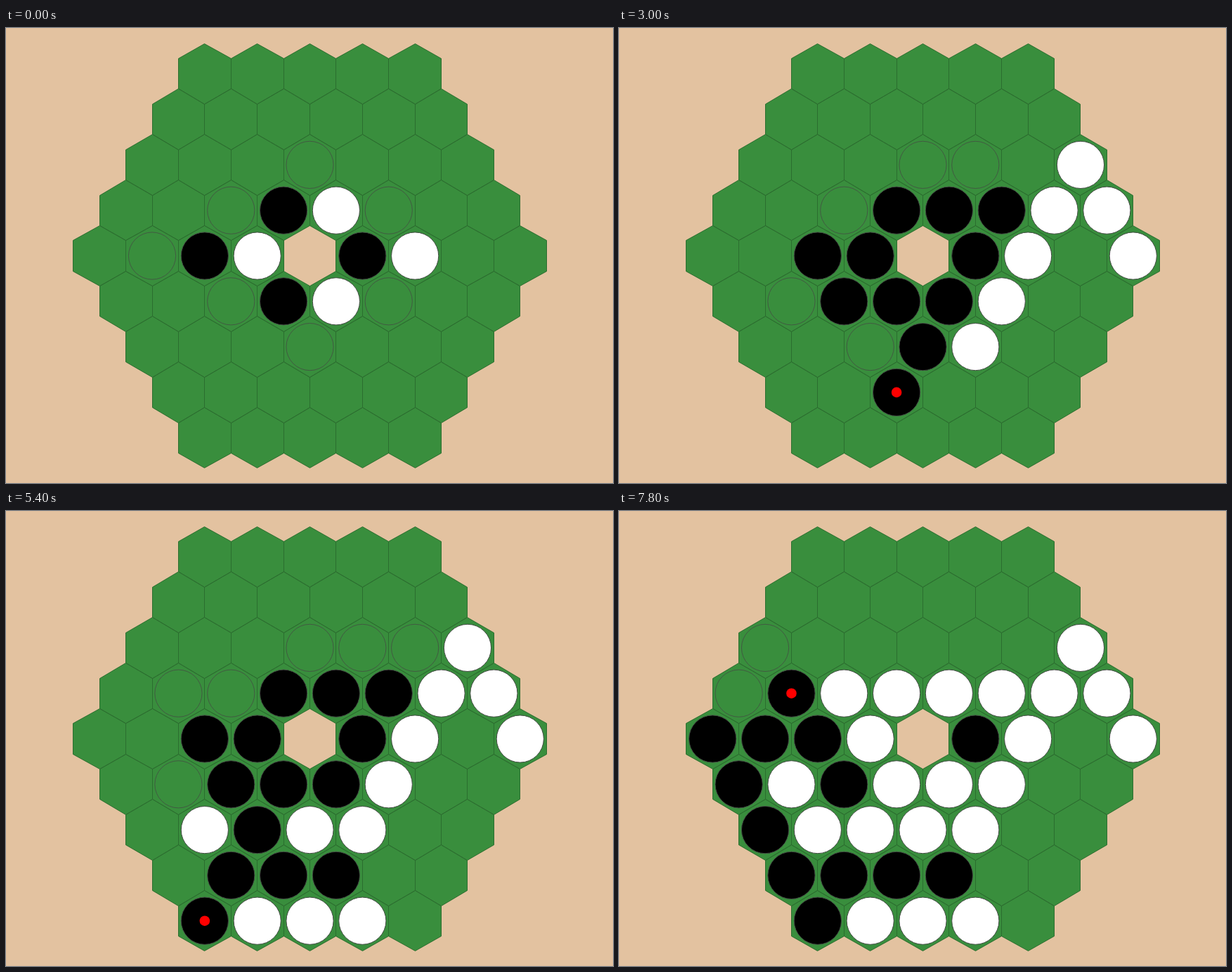
Recreate the animation shown at these times as an HTML page with a canvas. Size 864x648 px, loop 8 s.

```html
<!DOCTYPE html>
<html lang="en">
<head>
<meta charset="utf-8">
<title>Hexagonal Reversi</title>
<style>
  html, body { margin: 0; width: 100%; height: 100%; overflow: hidden; background: #e3c2a0; }
  canvas { display: block; width: 100%; height: 100%; }
</style>
</head>
<body>
<canvas id="board" width="864" height="648"></canvas>
<script>
const ctx = document.getElementById('board').getContext('2d');
const LOOP = 8000, STEP = 300;
const CX = 432.5, CY = 324.5, SIZE = 43.2, HALF = SIZE * Math.sqrt(3) / 2;
const STONE = 33.6, DOT = 7.3;
const WHITE = '#fff', BLACK = '#000';
const DIRS = [[1, 0], [0, 1], [-1, 1], [-1, 0], [0, -1], [1, -1]];

// Moves in axial coordinates [q, r]; white starts and the players alternate.
const MOVES = [
  [-1, 2], [-2, 1], [2, -1], [3, -1], [4, -2], [4, -1], [4, 0],
  [1, 1], [0, 2], [-2, 3], [-2, 2], [-3, 3], [-3, 4],
  [-2, 4], [-1, 4], [-1, 3], [-3, 2], [-4, 4], [-3, 1], [-4, 3],
  [-4, 2], [-4, 1], [-3, 0], [-4, 0], [-1, -1], [-2, -1]
];

const key = (q, r) => q + ',' + r;
const player = turn => turn % 2 ? BLACK : WHITE;
const centre = ([q, r]) => [CX + HALF * (2 * q + r), CY + SIZE * 1.5 * r];
const snap = v => Math.floor(v) + 0.5;

const cells = [];
for (let r = -4; r <= 4; r++)
  for (let q = -4; q <= 4; q++)
    if (Math.abs(q + r) <= 4 && (q || r)) cells.push([q, r]);

function captures(stones, [q, r], color) {
  const taken = [];
  if (stones.has(key(q, r))) return taken;
  for (const [dq, dr] of DIRS) {
    const line = [];
    for (let n = 1; ; n++) {
      const k = key(q + n * dq, r + n * dr), found = stones.get(k);
      if (found === color) taken.push(...line);
      if (!found || found === color) break;
      line.push(k);
    }
  }
  return taken;
}

function playGame() {
  let stones = new Map();
  [[1, -1], [-1, 0], [2, 0], [0, 1]].forEach(c => stones.set(key(...c), WHITE));
  [[0, -1], [-2, 0], [1, 0], [-1, 1]].forEach(c => stones.set(key(...c), BLACK));
  const states = [];
  for (let turn = 0; turn <= MOVES.length; turn++) {
    const color = player(turn);
    const hints = cells.filter(c => captures(stones, c, color).length);
    states.push({ stones, hints, last: MOVES[turn - 1] });
    if (turn === MOVES.length) break;
    const next = new Map(stones);
    for (const k of captures(stones, MOVES[turn], color)) next.set(k, color);
    next.set(key(...MOVES[turn]), color);
    stones = next;
  }
  return states;
}

function hexagon(cell) {
  const [x, y] = centre(cell);
  ctx.beginPath();
  for (let i = 0; i < 6; i++) {
    const a = Math.PI * (i / 3 + 1 / 6);
    ctx.lineTo(snap(x + SIZE * Math.cos(a)), snap(y + SIZE * Math.sin(a)));
  }
  ctx.closePath();
}

function disc(cell, radius, fill, stroke) {
  ctx.beginPath();
  ctx.arc(...centre(cell), radius, 0, 2 * Math.PI);
  if (fill) { ctx.fillStyle = fill; ctx.fill(); }
  if (stroke) { ctx.strokeStyle = stroke; ctx.stroke(); }
}

function draw({ stones, hints, last }) {
  ctx.fillStyle = '#e3c2a0';
  ctx.fillRect(0, 0, 864, 648);
  ctx.lineWidth = 1;
  ctx.fillStyle = '#398e3d';
  ctx.strokeStyle = '#2b6e2f';
  for (const c of cells) { hexagon(c); ctx.fill(); }
  for (const c of cells) { hexagon(c); ctx.stroke(); }
  for (const c of cells) {
    const color = stones.get(key(...c));
    if (color) disc(c, STONE, color, '#424a42');
  }
  for (const c of hints) disc(c, STONE, null, '#425a42');
  if (last) disc(last, DOT, '#f00');
}

const states = playGame();
let shown = -1;
function tick() {
  const step = Math.floor(performance.now() % LOOP / STEP);
  if (step !== shown) draw(states[shown = step]);
  requestAnimationFrame(tick);
}
tick();
</script>
</body>
</html>
```
